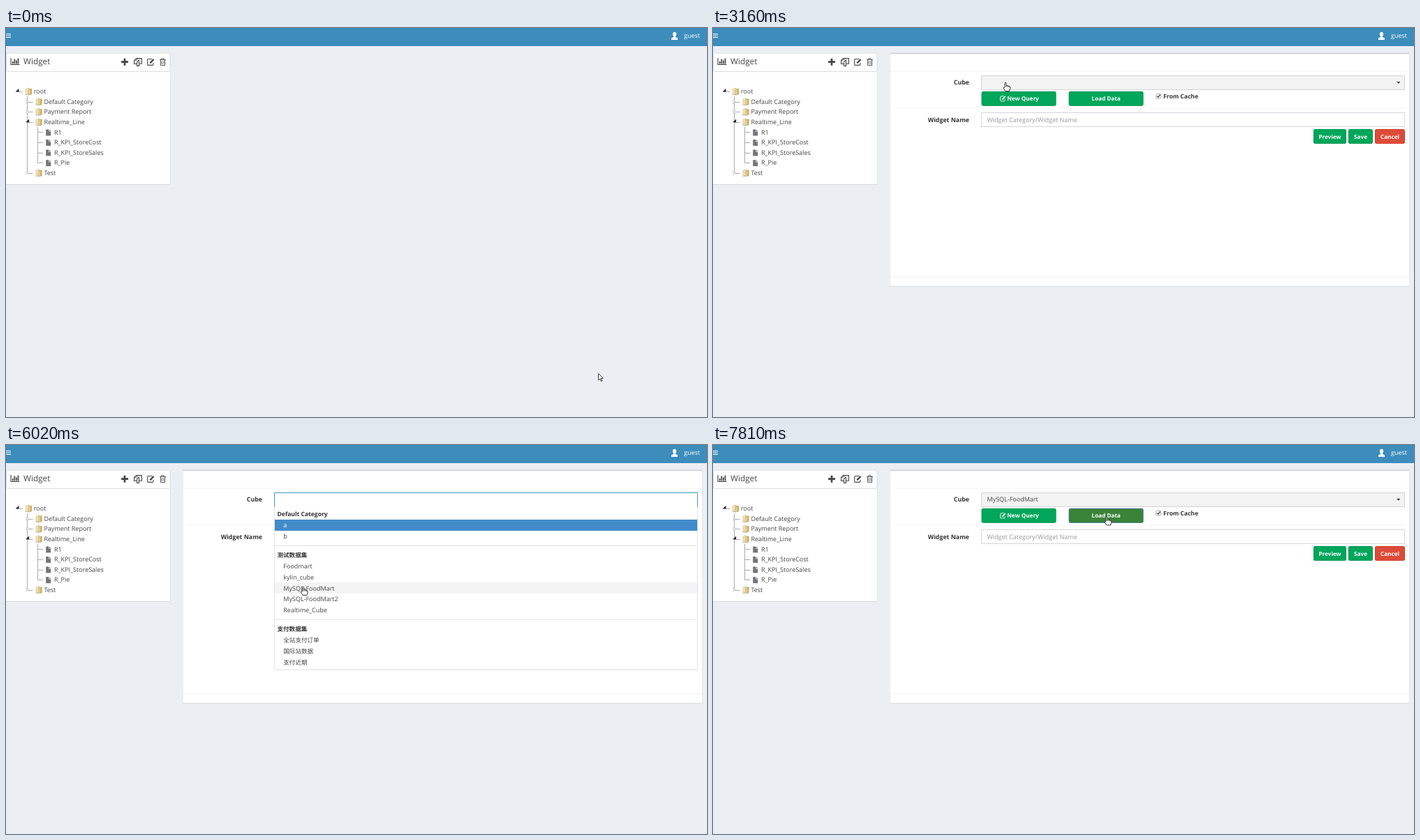
These frames come from a looping animation (1004x558 px, 8 s). An HTML page:

```html
<!DOCTYPE html>
<html lang="en">
<head>
<meta charset="utf-8">
<title>Widget editor</title>
<style>
html, body { margin: 0; width: 100%; height: 100%; overflow: hidden; background: #ebeff4; }
svg { display: block; width: 100vw; height: 100vh; }
text { font: 9px "Open Sans", "Noto Sans CJK SC", "Noto Sans CJK", sans-serif; fill: #444; text-rendering: geometricPrecision; }
.title { font-size: 11.8px; }
.label { font-weight: 700; font-size: 8.8px; fill: #333; }
.head { font-weight: 700; font-size: 8.55px; fill: #333; }
.button { font-weight: 700; font-size: 8.2px; fill: #fff; text-anchor: middle; }
.end { text-anchor: end; }
.line { fill: none; stroke: #444; }
</style>
</head>
<body>
<svg viewBox="0 0 1004 558">
  <defs>
    <linearGradient id="gold">
      <stop offset="0" stop-color="#f3e5b5"/><stop offset="1" stop-color="#cba94f"/>
    </linearGradient>
    <g id="folder">
      <path d="M1 1.5 5.5 0V9L1 10Z" fill="#f6edcf" stroke="#c9b069" stroke-width=".7"/>
      <path d="M4 2.5 9 1V9L4 10.3Z" fill="url(#gold)" stroke="#bb9c50" stroke-width=".7"/>
      <path d="M0 9.5H9" stroke="#bbb" stroke-width=".6"/>
    </g>
    <g id="doc">
      <path d="M0 0H4V3.2H7V9H0Z" fill="#777479"/>
      <path d="M4.7 0 7 2.5H4.7Z" fill="#777479"/>
    </g>
    <g id="edit" fill="none" stroke="currentColor">
      <path d="M7.5 1.5H2Q.6 1.5.6 3V9Q.6 10.4 2 10.4H7.6Q9 10.4 9 9V7" stroke-width="1.1"/>
      <path d="M4.3 7.4 9.6 2" stroke-width="2.3"/>
    </g>
  </defs>

  <rect width="1004" height="558" fill="#ebeff4"/>
  <rect width="1004" height="26" fill="#3c8dbc"/>
  <path d="M0 8.5H7M0 11H7M0 13.5H7" stroke="#fff" stroke-width="1.2"/>
  <g fill="#fff">
    <ellipse cx="957.5" cy="9" rx="2.6" ry="3.2"/>
    <path d="M956 11H959V13L962 14.5V17H953V14.5L956 13Z"/>
  </g>
  <text x="971" y="14" style="fill:#fff">guest</text>

  <rect x="0" y="63" width="235.5" height="162" fill="#d5d9de"/>
  <rect x="0" y="62" width="235" height="162" fill="#fff"/>
  <rect x=".5" y="36" width="234.5" height="26.5" rx="2" fill="#fff" stroke="#d9dce0"/>
  <path class="line" d="M7 43V52.5H19.5" stroke-width="1.1"/>
  <path class="line" d="M9.7 51.5V48M12.3 51.5V44.5M14.9 51.5V46.5M17.5 51.5V43.5" stroke-width="1.7"/>
  <text class="title" x="25" y="52">Widget</text>
  <path class="line" d="M165 48.7H175M170 43.7V53.7" stroke-width="2.7"/>
  <path class="line" d="M187.5 46V43.6H194.4V51.2H190.5M186.5 46.2H183.6V51.5H187.5M187.6 48.5 190 46.2H190.5V54.4H187.6ZM183.6 46.3 186.5 43.6H188" stroke-width="1.1"/>
  <use href="#edit" x="202" y="43" color="#444"/>
  <path class="line" d="M220 45.5H229M222.8 45V43.7H226.2V45M221.4 45.5V53.5H227.6V45.5M223.2 47.3V51.8M225.8 47.3V51.8" stroke-width=".9"/>
  <g id="tree"></g>

  <g id="panel">
    <rect x="253" y="36" width="744.5" height="335" rx="1.5" fill="#d9dde2"/>
    <rect x="253.5" y="35" width="743.5" height="335" rx="1.5" fill="#fff"/>
    <path d="M253.5 36.2H997" stroke="#cfd3da" stroke-width="2"/>
    <path d="M254 62H997M260 115H990M254 357.5H997" stroke="#f3f3f3"/>
    <text class="label end" x="367" y="81">Cube</text>
    <text class="label end" x="367" y="135">Widget Name</text>
    <rect x="384.5" y="68.5" width="606" height="20" fill="#f3f3f3" stroke="#d4d4d4"/>
    <path d="M979 77H984.4L981.7 79.8Z" fill="#333"/>
    <text id="chosen" x="392.5" y="81">MySQL-FoodMart</text>
    <g id="buttons"></g>
    <use href="#edit" transform="translate(411 96.7) scale(.8)" color="#fff"/>
    <rect x="634.5" y="94.5" width="7" height="6.5" rx="1" fill="#fff" stroke="#999" stroke-width=".8"/>
    <path class="line" d="M636 97.5 637.6 99.3 640.5 95.5" stroke-width="1.3"/>
    <text class="head" x="645" y="101.3">From Cache</text>
    <rect x="384.5" y="121.5" width="606" height="20" fill="#fff" stroke="#d2d6de"/>
    <text x="392.5" y="135.2" style="fill:#999">Widget Category/Widget Name</text>

    <g id="list">
      <rect x="384.5" y="88.5" width="606" height="234" rx="1" fill="#fff" stroke="#e2e2e2"/>
      <path id="search" d="M384.5 89V68.5H990.5V89" fill="#fff"/>
      <path id="textCaret" d="M393 73V84.5" stroke="#777"/>
      <rect x="385" y="107" width="605" height="16" fill="#428bca"/>
      <rect id="hover" x="385" y="197" width="605" height="16" fill="#f4f4f4"/>
      <path d="M385 144.3H990M385 250.4H990" stroke="#e3e3e3"/>
      <g id="items"></g>
    </g>
  </g>

  <g id="pointer" fill="#fff" stroke="#222" stroke-width=".9" stroke-linejoin="round">
    <path id="arrow" d="M0 0V9.6L2.2 7.6 3.8 11.3 5.3 10.7 3.7 7H6.6Z"/>
    <path id="hand" d="M-1 7V.8Q0-.4 1 .8V4.7Q2.2 3.9 3 5Q4.2 4.4 5 5.6Q6.4 5.2 6.5 6.8V9L5.3 12.5H-.3L-3 8.2Q-3.2 6.4-1 7.4M1 4.7V6.5M3 5V6.7M5 5.6V7"/>
  </g>
</svg>
<script>
const el = id => document.getElementById(id);
const show = (id, on) => { el(id).style.display = on ? '' : 'none'; };
const label = (x, y, text, cls = '', fill = '') =>
  `<text x="${x}" y="${y}" class="${cls}"${fill && ` style="fill:${fill}"`}>${text}</text>`;

// Tree rows: depth, name, expanded
const rows = [
  [0, 'root', true], [1, 'Default Category'], [1, 'Payment Report'], [1, 'Realtime_Line', true],
  [2, 'R1'], [2, 'R_KPI_StoreCost'], [2, 'R_KPI_StoreSales'], [2, 'R_Pie'], [1, 'Test']
];
el('tree').innerHTML = '<path d="M30.5 98V208M45.5 142V193.5" stroke="#aaa"/>' +
  rows.map(([depth, name, open], i) => {
    const x = 16 + depth * 14.6, y = 91 + i * 14.6;
    const toggle = open
      ? `<path d="M${x + 2.5} ${y - 4}V${y + .5}H${x - 2.5}Z" fill="#222"/>`
      : depth < 2 ? `<path d="M${x - 1.5} ${y - 2}V${y + 2.5}L${x + 1.5} ${y}Z" fill="#fff" stroke="#bbb" stroke-width=".7"/>` : '';
    const icon = depth < 2
      ? `<use href="#folder" x="${x + 11.5}" y="${y - 5}"/>`
      : `<use href="#doc" x="${x + 12}" y="${y - 4}"/>`;
    return `<path d="M${x} ${Math.round(y) + .5}h8" stroke="#aaa"/>` + toggle + icon + label(x + 23.8, y + 3.1, name);
  }).join('');

const GREEN = ['#00a65a', '#009551'], RED = ['#dd4b39', '#d33724'];
const buttons = [
  ['newQuery', 385, 91, 106, 'New Query', GREEN, 6], ['loadData', 510, 91, 106, 'Load Data', GREEN, 0],
  ['preview', 860.5, 145.3, 46, 'Preview', GREEN, 0], ['save', 910.5, 145.3, 34, 'Save', GREEN, 0],
  ['cancel', 948.5, 145.3, 42, 'Cancel', RED, 0]
];
el('buttons').innerHTML = buttons.map(([id, x, y, w, text, [fill, edge], shift]) =>
  `<rect id="${id}" x="${x}" y="${y + .3}" width="${w}" height="20" rx="1.7" fill="${fill}" stroke="${edge}"/>` +
  label(x + w / 2 + shift, y + 13.3, text, 'button')).join('');

const groups = [
  [102, 'Default Category', 'a', 'b'],
  [161, '测试数据集', 'Foodmart', 'kylin_cube', 'MySQL-FoodMart', 'MySQL-FoodMart2', 'Realtime_Cube'],
  [267.3, '支付数据集', '全站支付订单', '国际站数据', '支付近期']
];
el('items').innerHTML = groups.map(([y, head, ...names]) =>
  label(388.5, y, head, 'head') + names.map((name, i) =>
    label(397.3, y + 16 + i * 15.8, name, name > '一' ? 'cjk' : '', name === 'a' ? '#fff' : '')).join('')).join('');
document.querySelectorAll('.cjk').forEach(t => { t.style.fontSize = '8.55px'; });

// Pointer stops: time, x, y, shape
const stops = [
  [0, 848.5, 495.5, 'arrow'], [200, 596.5, 373.5, 'arrow'],
  [530, 430, 247, 'arrow'], [740, 290, 141, 'arrow'], [950, 205, 77, 'arrow'], [1160, 171, 49, 'hand'],
  [2760, 245, 60, 'arrow'], [2960, 345, 73, 'arrow'], [3160, 419, 78, 'hand'],
  [5000, 363.5, 84.5, 'arrow'], [5200, 374, 104, 'arrow'], [5400, 392, 138, 'arrow'],
  [5610, 409, 170, 'hand'], [5820, 420, 192, 'hand'], [6020, 425.5, 203, 'hand'],
  [6220, 428, 203.5, 'hand'], [6420, 429.5, 203.5, 'hand'], [6820, 429.5, 203.5, 'hand'],
  [7050, 429.5, 203.5, 'arrow'], [7240, 477, 170, 'arrow'], [7430, 530, 128, 'arrow'],
  [7620, 560, 106, 'hand'], [7810, 564, 102.5, 'hand']
];

function draw(t) {
  const [time, x, y, shape] = stops.findLast(stop => stop[0] <= t);
  el('pointer').setAttribute('transform', `translate(${x} ${y})`);
  show('arrow', shape === 'arrow');
  show('hand', shape === 'hand');

  show('panel', t >= 1960);
  show('list', t >= 3430 && t < 7050);
  show('chosen', t >= 7050);
  show('hover', t >= 6020);
  show('textCaret', time < 5000 || Math.floor((time - 5000) / 530) % 2 === 0);
  el('search').setAttribute('stroke', t < 3630 ? '#ccd0d6' : t < 3830 ? '#a9c3d3' : t < 6820 ? '#3f9ac4' : '#82bbdc');

  const [fill, edge] = t >= 7810 ? ['#398439', '#3a6f8a'] : t >= 7620 ? ['#008d4c', '#008046'] : GREEN;
  el('loadData').setAttribute('fill', fill);
  el('loadData').setAttribute('stroke', edge);
}

const start = performance.now();
function tick() {
  draw((performance.now() - start) % 8000);
  requestAnimationFrame(tick);
}
tick();
</script>
</body>
</html>
```
